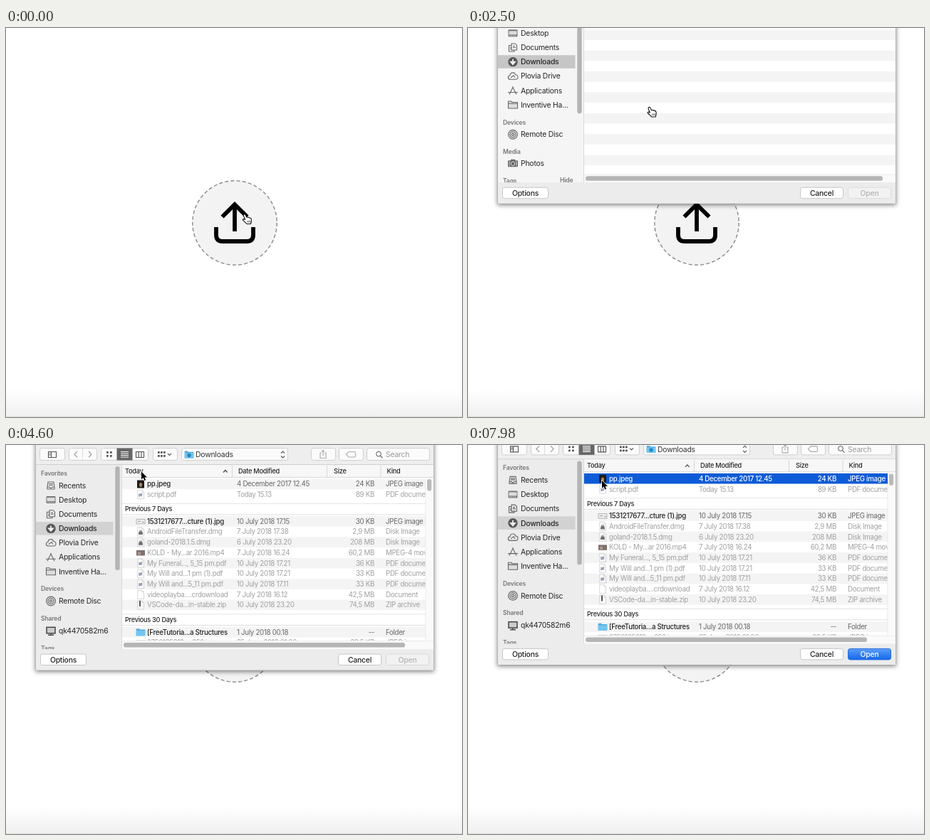
Write an HTML page that moves like this. It is 640 px wide and 547 px high and loops after 8 s.

```html
<!DOCTYPE html>
<html lang="en">
<head>
<meta charset="utf-8">
<title>Choosing a file to upload</title>
<style>
html, body { margin: 0; width: 100%; height: 100%; overflow: hidden; background: #fff; }
svg { display: block; width: 100vw; height: 100vh; }
text { font-family: Inter, "Liberation Sans", sans-serif; fill: #262626; white-space: pre; }
.side { font-size: 10.4px; letter-spacing: -.02em; }
.head { font-size: 8.6px; letter-spacing: -.02em; font-weight: 600; fill: #777; }
.cell { font-size: 9.7px; letter-spacing: -.03em; }
.col { font-size: 9.2px; letter-spacing: -.03em; font-weight: 500; }
.mid { font-weight: 500; }
.end { text-anchor: middle; }
.right { text-anchor: end; }
.ico { fill: none; stroke: #666; stroke-width: 1.1; }
.shadow { filter: drop-shadow(0 2px 3px rgba(0, 0, 0, .5)); }
</style>
</head>
<body>
<svg id="stage" viewBox="0 0 640 547" preserveAspectRatio="none"></svg>
<script>
const stage = document.getElementById('stage');
const ROW = 14.68;

const rect = (x, y, w, h, fill, extra = '') =>
  `<rect x="${x}" y="${y}" width="${w}" height="${h}" fill="${fill}" ${extra}/>`;
const text = (x, y, str, cls, extra = '') =>
  `<text x="${x}" y="${y}" dy=".36em" class="${cls}" ${extra}>${str}</text>`;
const path = (d, extra = '') => `<path d="${d}" ${extra}/>`;
const at = (x, y, body) => `<g transform="translate(${x} ${y})">${body}</g>`;
const tint = c => `style="fill:${c}"`;

// Icons are drawn around their own centre.
const sideIcons = {
  recents: path('M-5 2 -4 -5H4L5 2V5H-5ZM-5 2H-2L-1 3.5H1L2 2H5M-3 -2.5H3M-3 -.5H3', 'class="ico"'),
  desktop: rect(-6.5, -5, 13, 10, '#777', 'rx="1"') + rect(-5.5, -3, 11, 5, '#ddd') +
    path('M-5 3.5H5', 'stroke="#ddd" stroke-dasharray="1.5 1"'),
  documents: path('M-2 -5.5H3L5.5 -3V3.5H-2ZM-2 -3H-5.5V5.5H2V3.5M0 -2H3M0 0H4M-4 0H-2M-4 2H-2', 'class="ico"'),
  downloads: '<circle r="6.7" fill="#555"/>' + path('M0 -4V2M-3 0 0 3.5 3 0Z', 'fill="#eee" stroke="#eee" stroke-width="1.8"'),
  cloud: path('M-4 4.5C-8 4 -7 -1 -4 -1C-4 -6 3 -6 3.5 -2C8 -2 8 4.5 4 4.5ZM-3 2 1 -1 3 2', 'class="ico"'),
  apps: path('M-5 5.5 .5 -5.5M-.5 -5.5 5 5.5M-7 2.5H7', 'class="ico" stroke-width="1.4"'),
  folder: path('M-6.5 -5H-2L-1 -3.5H6.5V5H-6.5ZM-6.5 -1.8H6.5', 'class="ico" style="fill:#ddd"'),
  disc: '<circle r="6.4" class="ico" style="fill:#ddd"/><circle r="4" class="ico"/><circle r="1.6" class="ico"/>',
  photos: rect(-7, -4, 14, 9, '#666', 'rx="1"') + rect(-3, -5.5, 6, 3, '#666') +
    '<circle cy=".5" r="2.8" fill="#666" stroke="#ddd"/>' + path('M-5 -3V4M5 -3V4', 'stroke="#ddd"'),
  computer: rect(-6, -5, 12, 8.5, '#ccc', 'stroke="#444" stroke-width="1.5"') + path('M0 4V6M-4 6H4', 'stroke="#444" stroke-width="1.4"')
};

const page = path('M-4.3 -6H2L4.5 -3.5V6H-4.3Z', 'fill="#fff" stroke="#bbb" stroke-width=".8"') +
  path('M2 -6V-3.5H4.5', 'fill="none" stroke="#bbb" stroke-width=".7"');
const blueFolder = path('M-6.3 -5H-2L-1 -3.7H6.3V5H-6.3Z', 'fill="#50aee0"') + rect(-6.3, -2.3, 12.6, 7.3, '#72c5f0', 'rx=".7"');
const fileIcons = {
  photo: rect(-5, -5.5, 10, 11, '#1d1a18') + '<ellipse cy="1" rx="2" ry="3" fill="#a88a62"/>',
  card: rect(-6, -3, 12, 6.5, '#eee', 'stroke="#aaa" stroke-width=".8"') + path('M-4 0H0M2 1H5', 'stroke="#999"'),
  pdf: page + rect(-2.8, -1.5, 5, 4, '#8795b5') + path('M-2 3 2 -2', 'stroke="#59647d"'),
  disk: page + path('M-3 2 -2 -1H2L3 2V4H-3Z', 'fill="#444"') + rect(-2, -2.5, 4, 2, '#999'),
  film: rect(-6, -3.5, 12, 7.5, '#55423e') + rect(-4, -1, 4, 4, '#947569'),
  page,
  zip: page + path('M-1 -6V2', 'stroke="#222" stroke-width="2"'),
  folder: blueFolder
};

const files = [
  [55, 'photo', 'pp.jpeg', '4 December 2017 12.45', '24 KB', 'JPEG image', 1],
  [69.7, 'pdf', 'script.pdf', 'Today 15.13', '89 KB', 'PDF document'],
  [107.3, 'card', '1531217677...cture (1).jpg', '10 July 2018 17.15', '30 KB', 'JPEG image', 1],
  [122, 'disk', 'AndroidFileTransfer.dmg', '7 July 2018 17.38', '2,9 MB', 'Disk Image'],
  [136.7, 'disk', 'goland-2018.1.5.dmg', '6 July 2018 23.20', '208 MB', 'Disk Image'],
  [151.5, 'film', 'KOLD - My...ar 2016.mp4', '7 July 2018 16.24', '60,2 MB', 'MPEG-4 movie'],
  [166.2, 'pdf', 'My Funeral..., 5_15 pm.pdf', '10 July 2018 17.21', '36 KB', 'PDF document'],
  [180.9, 'pdf', 'My Will and...1 pm (1).pdf', '10 July 2018 17.21', '33 KB', 'PDF document'],
  [195.6, 'pdf', 'My Will and...5_11 pm.pdf', '10 July 2018 17.11', '33 KB', 'PDF document'],
  [210.3, 'page', 'videoplayba....crdownload', '7 July 2018 16.12', '42,5 MB', 'Document'],
  [225, 'zip', 'VSCode-da...in-stable.zip', '10 July 2018 23.20', '74,5 MB', 'ZIP archive'],
  [263.3, 'folder', '[FreeTutoria...a Structures', '1 July 2018 00.18', '--', 'Folder', 1],
  [278, 'card', '2750125618_...350.jpg', '25 June 2018 01.06', '82,5 KB', 'JPEG image']
];
const shaded = [0, 2, 4, 6, 8, 10, 11];

function fileRow([y, icon, name, date, size, kind, usable], picked) {
  const strong = picked ? '#fff' : usable ? '#222' : '#a0a0a0';
  const soft = picked ? '#fff' : usable ? '#666' : '#a0a0a0';
  const weight = usable ? 'cell mid' : 'cell';
  const rest = picked ? 'cell mid' : 'cell';
  return at(189, y, `<g opacity="${usable ? 1 : .75}">${fileIcons[icon]}</g>`) +
    text(198, y, name, weight, tint(strong)) + text(324, y, date, rest, tint(soft)) +
    text(517, y, size, rest + ' right', tint(soft)) + text(533, y, kind, rest, tint(soft));
}

function sidebar(live) {
  const items = [[57, 'recents', 'Recents'], [77, 'desktop', 'Desktop'], [97.2, 'documents', 'Documents'],
    [117.4, 'downloads', 'Downloads'], [137.5, 'cloud', 'Plovia Drive'], [157.7, 'apps', 'Applications'],
    [177.8, 'folder', 'Inventive Ha...'], [219.5, 'disc', 'Remote Disc'],
    live ? [261.3, 'computer', 'qk4470582m6'] : [260, 'photos', 'Photos']];
  const heads = [[39.7, 'Favorites'], [202.3, 'Devices'], live ? [244, 'Shared'] : [243.5, 'Media'], [live ? 286 : 284.5, 'Tags']];
  return rect(42, 28, 120.5, 259, live ? '#ececec' : '#f5f5f5') +
    rect(42, 108, 108.5, 18.5, live ? '#d2d2d2' : '#c6c6c6') +
    heads.map(([y, s]) => text(49, y, s, 'head')).join('') +
    (live ? '' : text(129, 284, 'Hide', 'head')) +
    items.map(([y, icon, s]) => at(63, y, sideIcons[icon]) +
      text(74, y, s, icon === 'downloads' ? 'side mid' : 'side')).join('') +
    rect(153.3, 30, 6.4, live ? 146 : 160, '#b4b4b4', 'rx="3.2"') +
    rect(162, 28, 1, 259, '#d8d8d8');
}

function toolbar(live) {
  const ink = live ? '#555' : '#a2a2a2';
  const faint = live ? '#aaa' : '#b4b4b4';
  const box = ([x, w]) => rect(x + .5, 4.5, w, 17, live ? '#fbfbfb' : '#f7f7f7',
    `rx="3" stroke="${live ? '#cfcfcf' : '#dedede'}"`);
  const line = (d, c = ink) => path(d, `fill="none" stroke="${c}" stroke-width="1.1"`);
  const dots = (x, n, step, c) => [10.5, 15.5].map(y => Array.from({ length: n }, (_, i) =>
    rect(x + i * step, y - 1.5, 2.8, 2.8, c, 'rx=".6"')).join('')).join('');
  return rect(42, -12, 558, 40, live ? '#eeeeee' : '#f6f6f6') +
    [[47, 35], [88, 39], [133, 66], [206, 34], [246, 149], [428, 34], [467, 34], [506, 88]].map(box).join('') +
    rect(155.5, 4.5, 22, 17, live ? '#666' : '#dedede') +
    line('M59.5 9.5H70.5V17.5H59.5ZM63.5 9.5V17.5M60.5 12H62.5M60.5 14H62.5') +
    line('M100 9 96 13.2 100 17.4M116 9 120 13.2 116 17.4', live ? '#999' : '#aaa') +
    line('M107.5 5V21', '#dedede') +
    dots(141, 2, 5, ink) +
    line('M161 9.5H172M161 12H172M161 14.5H172M161 17H172', live ? '#fff' : '#888') +
    line('M182.5 9.5H193.5V17.5H182.5ZM186.3 9.5V17.5M190 9.5V17.5') +
    dots(213, 3, 4, ink) + line('M227 12 229.5 14.5 232 12') +
    at(257, 13.5, `<g opacity="${live ? 1 : .85}">${blueFolder}<circle cy="1" r="2.7" fill="#2787bd"/></g>`) +
    text(266, 13.4, 'Downloads', 'side', tint(live ? '#333' : '#939393')) +
    line('M386 11.5 388.5 9 391 11.5M386 15.5 388.5 18 391 15.5') +
    line('M443 11H441V18.5H449V11H447M445 15V7.5M443 9.5 445 7.3 447 9.5', faint) +
    line('M481 9.5H489Q490.500 9.500 490.500 11V15.500Q490.500 17 489 17H481L477.500 13.300Z', faint) +
    `<circle cx="523" cy="12.600" r="3.400" fill="none" stroke="${ink}"/>` + line('M525.500 15.200 528.500 18.200') +
    text(533, 13.4, 'Search', 'side', tint(live ? '#999' : '#bbb')) +
    rect(42, 27, 558, 1, live ? '#cfcfcf' : '#dadada');
}

function emptyList() {
  let out = rect(163, 28, 437, 248, '#fff');
  for (let i = 1; i < 17; i += 2) out += rect(163, 28 + i * ROW, 437, Math.min(ROW, 248 - i * ROW), '#f4f4f4');
  return out;
}

function fileList() {
  const bands = shaded.map(i => rect(163, files[i][0] - 7.4, 426, ROW, '#f4f4f4')).join('');
  const groups = [[90, 'Previous 7 Days'], [245.5, 'Previous 30 Days']].map(([y, s]) =>
    rect(163, y - 8, 426, 16, '#fff') + rect(163, y - 8, 426, .8, '#e0e0e0') +
    rect(163, y + 7.5, 426, .8, '#d6d6d6') + text(167, y, s, 'col')).join('');
  const columns = [[167, 'Today'], [326, 'Date Modified'], [460, 'Size'], [534.5, 'Kind']];
  return rect(163, 28, 437, 248, '#fff') +
    `<g clip-path="url(#rows)">${bands}${files.map(f => fileRow(f)).join('')}${groups}</g>` +
    rect(163, 28, 437, 17.5, '#f7f7f7') + rect(163, 45, 437, .8, '#d0d0d0') +
    [317, 450, 525.5].map(x => rect(x, 29, 1, 16, '#d5d5d5')).join('') +
    columns.map(([x, s]) => text(x, 36.7, s, 'col')).join('') +
    path('M305 38.5 307.8 35.5 310.600 38.500', 'fill="none" stroke="#444" stroke-width="1.2"') +
    rect(589, 46, 11, 230, '#fafafa') + rect(588.5, 46, .7, 230, '#e3e3e3') +
    rect(591, 48, 6.2, 16.5, '#bcbcbc', 'rx="3.1"');
}

const button = (x, w, label, fill, ink, edge) =>
  rect(x + .5, 294, w, 15.5, fill, `rx="3" stroke="${edge}"`) +
  text(x + w / 2 + .5, 301.8, label, 'side mid end', tint(ink));

const panel = live => `<g clip-path="url(#panel)">` + toolbar(live) + sidebar(live) +
  (live ? fileList() : emptyList()) +
  rect(163, 275.5, 437, 12, '#fafafa') + rect(163, 275.5, 437, .7, '#e4e4e4') +
  rect(165, 278.1, live ? 395 : 417, 6.5, '#b5b5b5', 'rx="3.2"') +
  rect(42, 287, 558, 30, '#ececec') +
  button(48, 64, 'Options', '#fff', '#222', '#c6c6c6') +
  button(466, 60, 'Cancel', '#fff', '#222', '#c6c6c6') +
  button(533, 60, 'Open', '#f2f2f2', '#b4b4b4', '#dadada') + '</g>';

stage.innerHTML = `<defs>
  <linearGradient id="foot" x2="0" y2="1"><stop stop-color="#fff"/><stop offset="1" stop-color="#f0f0f0"/></linearGradient>
  <linearGradient id="blue" x2="0" y2="1"><stop stop-color="#5a9ff8"/><stop offset="1" stop-color="#1466ec"/></linearGradient>
  <clipPath id="panel">${rect(42, -12, 558, 328.5, '#000')}</clipPath>
  <clipPath id="rows">${rect(163, 46, 426, 229.5, '#000')}</clipPath></defs>` +
  rect(0, 0, 640, 547, '#fff') + rect(0, 508, 640, 38, 'url(#foot)') + rect(0, 546, 640, 1, '#dedede') +
  '<circle cx="321" cy="274" r="59.2" fill="#f3f3f3" stroke="#8a8a8a" stroke-width="1.4" stroke-dasharray="5.1 3.166"/>' +
  path('M321 286V249M303.500 265.500 321 248.200 338.500 265.500M295 280V291Q295 300 304 300H338Q347 300 347 291V280',
    'fill="none" stroke="#000" stroke-width="5.800"') +
  `<g id="sheet">${rect(41.5, -20, 559, 336.500, '#ececec', 'class="shadow" stroke="#a5a5a5" stroke-width=".6"')}
    <g id="idle">${panel(false)}</g><g id="live">${panel(true)}</g>
    <g id="picked"><g clip-path="url(#rows)">${rect(163, 47.5, 426, 14.6, '#0d5bd7')}${fileRow(files[0], true)}</g>
    ${button(533, 60, 'Open', 'url(#blue)', '#fff', '#2a6fdc')}</g></g>` +
  `<g id="hand">${path('M.6 7.500L-1.600 2Q-2 0 -.3 -.2Q1 0 1.700 1.800L2.700 4.200Q4 3.300 5 4.400Q6.300 3.800 7.100 5Q9 4.800 9.300 7L9.400 10Q9 11.500 8.500 13.500H3Q1 11.300 -2.400 8.300Q-3 6.800 -1.400 6.600Z',
    'fill="#fff" stroke="#111" stroke-width="1.1" stroke-linejoin="round"')}
    ${path('M4 9V11.500M5.800 9V11.500M7.500 9V11.500', 'stroke="#111" stroke-width=".7"')}</g>` +
  `<g id="arrow">${path('M0 0V11L2.600 8.600 4.300 12.600 6.200 11.800 4.500 7.900H8Z',
    'fill="#000" stroke="#fff" stroke-width="1.4" paint-order="stroke" stroke-linejoin="round"')}</g>`;

const part = Object.fromEntries(['sheet', 'idle', 'live', 'picked', 'hand', 'arrow']
  .map(id => [id, document.getElementById(id)]));

// Pointer tip: time, x, y.
const track = [[0, 335, 262], [70, 340, 277], [140, 335, 279], [200, 328, 270], [260, 324, 262],
  [2000, 324, 262], [2460, 255, 111.5], [2640, 253, 111], [3400, 253, 111], [4200, 190, 37.5],
  [4800, 190, 37.5], [5700, 188, 49], [7980, 188, 50], [8000, 188, 50]];

const smooth = p => (1 - Math.cos(Math.PI * Math.min(1, Math.max(0, p)))) / 2;

function pointer(t) {
  const i = Math.max(1, track.findIndex(k => k[0] > t));
  const [a, b] = [track[i - 1], track[i]];
  const p = smooth((t - a[0]) / (b[0] - a[0]));
  return [1, 2].map(n => a[n] + (b[n] - a[n]) * p);
}

const sheetY = t => t < 7840
  ? -316 * (1 - smooth((t - 1948) / 803))
  : -7.5 * ((t - 7840) / 140) ** 2;

const show = (el, on) => { el.style.display = on ? '' : 'none'; };

function draw() {
  const t = performance.now() % 8000;
  const live = t >= 3200;
  const move = `translate(${pointer(t).join(' ')})`;
  show(part.sheet, t >= 1955);
  show(part.idle, !live);
  show(part.live, live);
  show(part.picked, t >= 6600);
  show(part.hand, t < 2620);
  show(part.arrow, t >= 2620);
  part.sheet.setAttribute('transform', `translate(0 ${sheetY(t).toFixed(2)})`);
  part.hand.setAttribute('transform', move);
  part.arrow.setAttribute('transform', move);
  requestAnimationFrame(draw);
}
draw();
</script>
</body>
</html>
```
